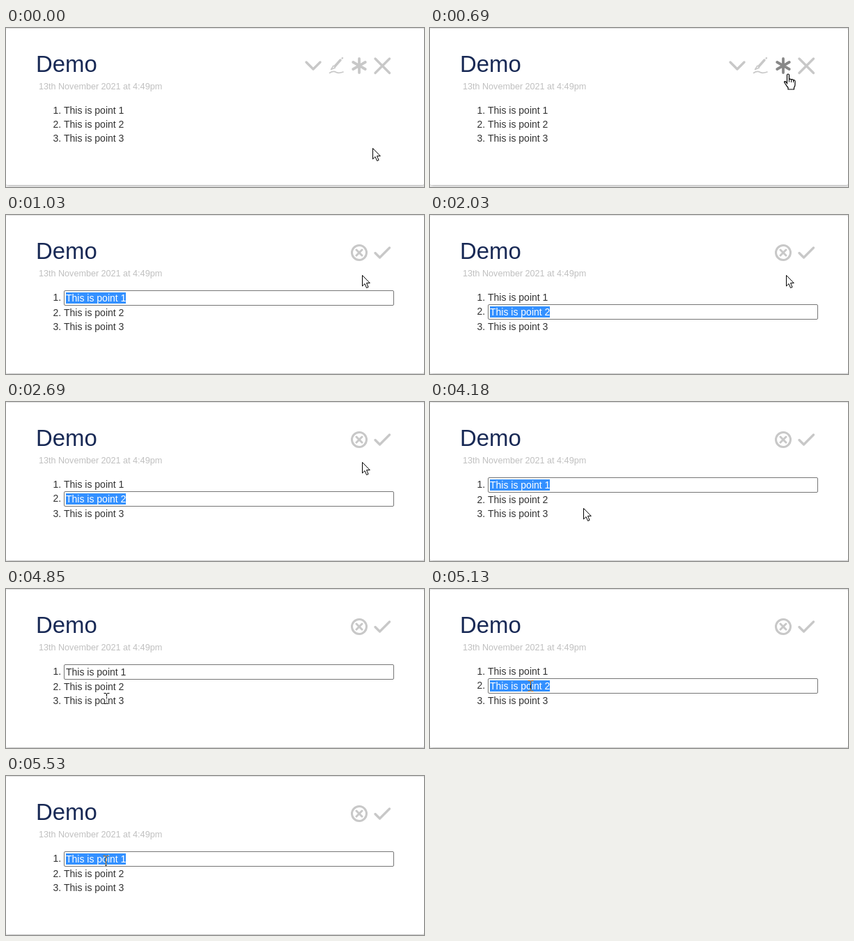
An HTML page for the animation above (5.59 s loop, 600 by 228 pixels).

```html
<!DOCTYPE html>
<html>
<head>
<meta charset="utf-8">
<style>
  html, body { margin: 0; width: 100%; height: 100%; overflow: hidden; background: #f4f4f4; }
  #card { position: absolute; left: 0; top: 1px; width: 600px; background: #fff; border-radius: 2px;
    box-shadow: 1px 1px 5px rgba(0, 0, 0, .3); }
  svg { position: absolute; left: 0; top: 0; }
  text { font: 14px "Liberation Sans", Arial, sans-serif; fill: #333; white-space: pre; }
  .title { font-size: 32.9px; fill: #182955; }
  .date { font-size: 12.6px; fill: #c0c0c0; }
  .icon { fill: none; stroke: #c8c8c8; stroke-width: 3.4; stroke-linecap: round; stroke-linejoin: round; }
  .hover { stroke: #888; }
  .field { fill: #fff; stroke: #767676; }
  .mark { fill: #3390ff; }
  .picked { fill: #fff; }
  #pointer path { stroke-linejoin: round; }
</style>
</head>
<body>
<div id="card"></div>
<svg width="600" height="228">
  <text class="title" x="43" y="63">Demo</text>
  <text class="date" x="47" y="88">13th November 2021 at 4:49pm</text>
  <g id="viewIcons">
    <path class="icon" d="M431 49l10 10 10-10"/>
    <g class="icon">
      <path d="M472 55l8-9"/>
      <path stroke-width="2.4" d="M482.6 43.4l.4-.4"/>
      <path stroke-width="1.4" d="M470 54l-3.5 5.500 6-2.500"/>
      <path stroke-width="1.6" d="M464.500 64.500c4-3 7-2.500 9.500-1s6 1 10-.5"/>
    </g>
    <path id="star" class="icon" style="stroke-width:3.8" d="M507 44v20M498.300 49l17.400 10M498.300 59l17.400-10"/>
    <path class="icon" d="M530 44l20.500 20.500M550.500 44l-20.500 20.500"/>
  </g>
  <g id="editIcons">
    <g id="cancel" class="icon" style="stroke-width:3">
      <circle cx="507" cy="54" r="10.500"/>
      <path d="M503 50l8 8M511 50l-8 8"/>
    </g>
    <path class="icon" d="M530 54.500l6.500 6.500 14-14"/>
  </g>
  <g id="list"></g>
</svg>
<svg id="pointer" width="600" height="228"><g id="cursor"></g></svg>
<script>
const $ = id => document.getElementById(id);
const LOOP = 5590, STEP = 70;

// start, number of steps, end point
const moves = [
  [60, 8, 514, 66], [760, 4, 511, 86], [3760, 8, 178, 155],
  [4320, 6, 144, 157], [4990, 2, 144, 139], [5400, 1, 143, 115], [5530, 1, 143, 122]
];

// start, edited item (0 = viewing), whether its text is selected
const states = [
  [0, 0, 0], [760, 1, 1], [2030, 2, 1], [2290, 3, 1], [2690, 2, 1], [3090, 1, 1],
  [4850, 1, 0], [4920, 3, 1], [5060, 3, 0], [5130, 2, 1], [5470, 2, 0], [5530, 1, 1]
];

const shapes = {
  arrow: '<path fill="#fff" stroke="#000" d="M.5.5v15.500l3.500-3.400 2.600 5.900 2.500-1.100-2.600-5.800h4.800z"/>',
  beam: '<path fill="none" stroke="#fff" d="M-3.500-7.500h2.500l1.500 1 1.500-1h2.500M.5-6.500v13M-3.500 7.500h2.500l1.500-1 1.500 1h2.500"/>',
  hand: '<path fill="#fff" stroke="#000" stroke-width="1.200" d="M-1.500 14V1.500q0-1.500 1.500-1.500t1.500 1.500v6q1.500-1 3 .5 1.700-.8 3 .7 2.500-.4 2.500 2v4.800q0 2-1.500 4v2.500h-8.500v-2.500q-3-3.500-5.500-8 .5-2.500 4 1.500z"/>' +
    '<path fill="none" stroke="#000" d="M1.500 7.500v4M4.500 8v4M7.500 9v3"/>'
};

function pointerAt(t) {
  let x = 526, y = 172;
  for (const [start, count, endX, endY] of moves) {
    if (t < start) break;
    const p = Math.min(1, (Math.floor((t - start) / STEP) + 1) / count);
    x += (endX - x) * p;
    y += (endY - y) * (1 - (1 - p) ** 1.5);
  }
  return [x, y];
}

function listMarkup(active, selected) {
  let top = 108, out = '';
  for (let i = 1; i <= 3; i++) {
    const label = `This is point ${i}`;
    out += `<text x="79.100" y="${top + 15}" text-anchor="end">${i}.</text>`;
    if (i === active) {
      out += `<rect class="field" x="83.500" y="${top + .5}" width="473" height="21" rx="1.500"/>`;
      if (selected) out += `<rect class="mark" x="86" y="${top + 3}" width="86" height="16"/>`;
      out += `<text class="${selected ? 'picked' : ''}" x="86" y="${top + 16}">${label}</text>`;
      top += 22;
    } else {
      out += `<text x="83" y="${top + 15}">${label}</text>`;
      top += 20;
    }
  }
  return out;
}

function draw(now) {
  const t = now % LOOP;
  const [, active, selected] = states.findLast(s => s[0] <= t);
  const [x, y] = pointerAt(t);
  const hover = y < 70;
  const fieldTop = 88 + 20 * active;
  const inField = active && y >= fieldTop && y < fieldTop + 22 && x > 83 && x < 557;
  const overText = y > 108 && y < 170 && x > 83 && x < 169;
  const kind = hover ? 'hand' : inField || overText ? 'beam' : 'arrow';

  $('card').style.height = (active ? 226 : 224) + 'px';
  $('viewIcons').style.display = active ? 'none' : '';
  $('editIcons').style.display = active ? '' : 'none';
  for (const id of ['star', 'cancel']) $(id).classList.toggle('hover', hover);
  $('list').innerHTML = listMarkup(active, selected);

  $('cursor').innerHTML = shapes[kind];
  $('cursor').setAttribute('transform', `translate(${Math.round(x)} ${Math.round(y)})`);
  // the text beam inverts what lies under it
  $('pointer').style.mixBlendMode = kind === 'beam' ? 'difference' : 'normal';
}

const begin = performance.now();
function tick() {
  draw(performance.now() - begin);
  requestAnimationFrame(tick);
}
tick();
</script>
</body>
</html>
```
